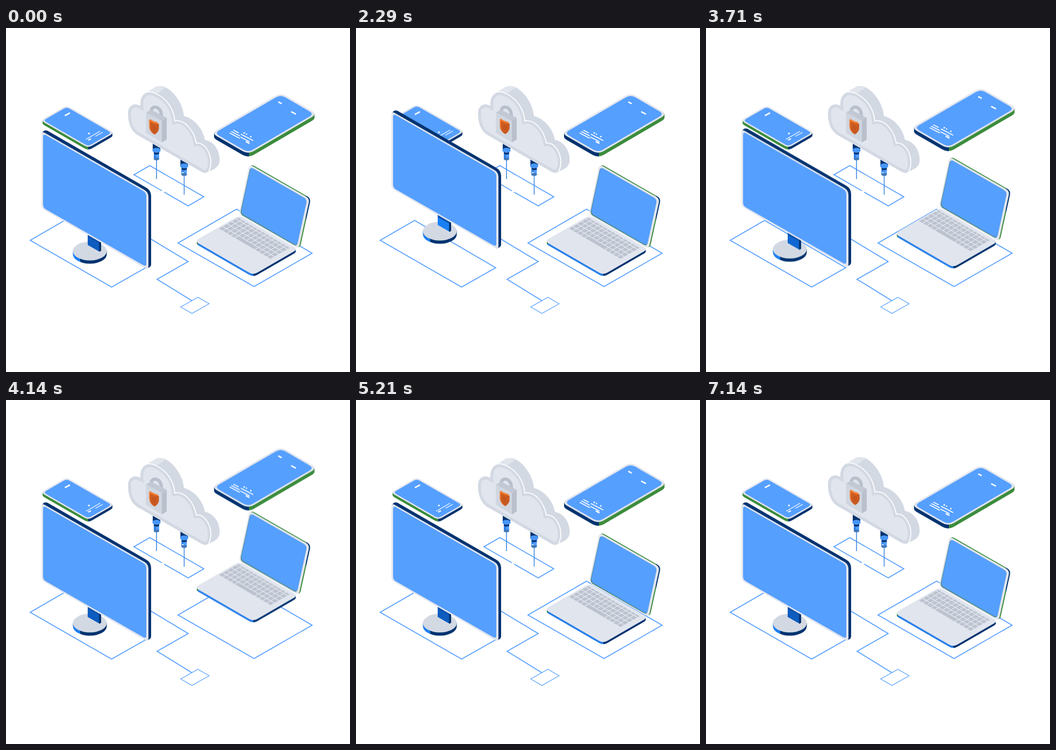
An HTML page for the animation above (7210 ms loop, 640x640 px).

```html
<!DOCTYPE html>
<html lang="en">
<head>
<meta charset="utf-8">
<title>Connected devices</title>
<style>
html, body { margin: 0; width: 100%; height: 100%; overflow: hidden; background: #fff; }
svg { display: block; width: 100vw; height: 100vh; }
.line { fill: none; stroke: #559fff; stroke-width: 1.7; }
.mark { fill: none; stroke: #fff; }

/* --t holds the clock, stepped at 14 pictures a second */
.move {
  animation: 7210ms linear infinite paused;
  animation-delay: calc(var(--t, 0) * -1ms);
}
#phone { --h: -50px; animation-name: phone; }
#monitor { --h: -52px; animation-name: monitor; }
#laptop { --h: -48.5px; animation-name: pair; }
#tablet { --h: -34px; animation-name: pair; }
#cloud { --h: -11px; animation-name: cloud; }
#shade { animation-name: shade; }
#shield { animation-name: sway; animation-duration: 4140ms; }

@keyframes phone {
  0%, .97% { transform: none; animation-timing-function: cubic-bezier(.75,0,.4,1); }
  15.67% { transform: translateY(var(--h)); animation-timing-function: cubic-bezier(.5,0,.8,.8); }
  22.19% { transform: translateY(calc(var(--h) * .33)); animation-timing-function: cubic-bezier(.2,.4,.6,1); }
  36.75%, 100% { transform: none; }
}
@keyframes monitor {
  0%, 22.19% { transform: none; animation-timing-function: cubic-bezier(.75,0,.4,1); }
  37.31% { transform: translateY(var(--h)); animation-timing-function: cubic-bezier(.5,0,.8,.8); }
  43.69% { transform: translateY(calc(var(--h) * .34)); animation-timing-function: cubic-bezier(.2,.4,.6,1); }
  57.56%, 100% { transform: none; }
}
@keyframes pair {
  0%, 44.52% { transform: none; animation-timing-function: cubic-bezier(.75,0,.4,1); }
  59.22% { transform: translateY(var(--h)); animation-timing-function: cubic-bezier(.5,0,.8,.8); }
  66.44% { transform: translateY(calc(var(--h) * .33)); animation-timing-function: cubic-bezier(.2,.4,.6,1); }
  83.22%, 100% { transform: none; }
}
@keyframes cloud {
  0%, 77.25% { transform: none; animation-timing-function: cubic-bezier(.75,0,.4,1); }
  92.09% { transform: translateY(var(--h)); animation-timing-function: cubic-bezier(.5,0,.8,.8); }
  99.03% { transform: translateY(calc(var(--h) * .18)); }
  100% { transform: none; }
}
@keyframes shade {
  0%, 22% { opacity: 1; }
  30%, 44% { opacity: 0; }
  55%, 100% { opacity: 1; }
}
@keyframes sway {
  0%, 100% { transform: translate(-1.3px, .8px); }
  28%, 74% { transform: none; }
}
</style>
</head>
<body>
<svg viewBox="0 0 640 640">
  <defs>
    <linearGradient id="phoneEdge" gradientUnits="userSpaceOnUse" x1="68" x2="198" y1="0" y2="0">
      <stop offset=".655" stop-color="#3c8c3c"/><stop offset=".655" stop-color="#003370"/>
    </linearGradient>
    <linearGradient id="tabletEdge" gradientUnits="userSpaceOnUse" x1="387" x2="574" y1="0" y2="0">
      <stop offset=".35" stop-color="#003370"/><stop offset=".35" stop-color="#3c8c3c"/>
    </linearGradient>
    <linearGradient id="laptopEdge" gradientUnits="userSpaceOnUse" x1="355" x2="540" y1="0" y2="0">
      <stop offset=".012" stop-color="#3c8c3c"/><stop offset=".012" stop-color="#2a80ea"/>
      <stop offset=".57" stop-color="#2a80ea"/><stop offset=".57" stop-color="#003370"/>
    </linearGradient>
    <linearGradient id="lidEdge" gradientUnits="userSpaceOnUse" x1="434" x2="566" y1="0" y2="0">
      <stop offset=".94" stop-color="#3c8c3c"/><stop offset=".94" stop-color="#003370"/>
    </linearGradient>
    <linearGradient id="baseEdge" gradientUnits="userSpaceOnUse" x1="124" x2="188" y1="0" y2="0">
      <stop offset=".22" stop-color="#1f7ff0"/><stop offset=".22" stop-color="#003370"/>
    </linearGradient>
    <path id="front" d="M227 159C227 143 240 139 250 145C249 122 263 114 281 123C299 132 312 150 314 173C331 169 350 190 354 214C368 212 381 230 381 250C381 267 374 273 363 267L243 198C233 191 227 177 227 159Z"/>
    <clipPath id="frontClip"><use href="#front"/></clipPath>
    <g id="plug">
      <path d="M273 206H287V228H273Z" fill="#003370"/>
      <path d="M275 228H285V236H275Z" fill="#003370"/>
      <path d="M275 234Q280 237 285 234V244H275Z" fill="#559fff"/>
      <path d="M275 234Q277 236 279 236V245H275Z" fill="#2a80ea"/>
      <ellipse cx="280" cy="243.5" rx="5" ry="2.8" fill="#4579b8"/>
      <ellipse cx="280" cy="227.5" rx="7.7" ry="4.6" fill="#4796f7"/>
      <path d="M280 246V281" stroke="#4a90e2" stroke-width="1.7"/>
    </g>
  </defs>

  <g id="phone" class="move">
    <g id="phoneBody"/>
    <path class="mark" stroke-width="2.6" d="M109.5 163.2L119 158"/>
    <path class="mark" stroke-width="1.3" d="M149 207L175 192M166.500 201.500L180 194"/>
    <path class="mark" stroke-width="2.3" d="M153 208.500L158 206M152.700 196.500L156 196"/>
  </g>

  <g class="line">
    <path d="M45 395L109 358L260 446L196.500 482Z"/>
    <path d="M238 273L267.500 256L368 314L339 331Z"/>
    <path d="M320 400L429 337L569.500 419L461.500 481Z"/>
    <path d="M262 388L339 434.500L281 467.500L346 507.500"/>
    <path d="M325 519L357 501L378 513L346 531Z" stroke-width="1.1"/>
  </g>
  <path class="mark" stroke-width="3" d="M290 303L294 305.300"/>

  <use href="#plug"/>
  <use href="#plug" x="51.500" y="29"/>
  <circle cx="329" cy="269" r="1.3" fill="#fff"/>

  <g id="cloud" class="move">
    <path fill="#d3d9e3" d="M258 122L278 110C290 104 305 112 316 127C325 139 330 151 331 164C346 166 367 186 370 208C386 211 397 226 397.500 244C398 255 392 260 386 263L370 270L300 200Z"/>
    <path fill="#e1e5ec" d="M260 121L278 110Q288 106 298 110L281 122Z"/>
    <use href="#front" fill="#e1e5ee"/>
    <g clip-path="url(#frontClip)">
      <use href="#front" fill="none" stroke="#d3d9e3" stroke-width="11"/>
    </g>
    <path fill="none" stroke="#fff" stroke-width="1.8" d="M258 121C264 117 273 119 281 123C299 132 312 150 314 173C331 169 350 190 354 214C368 212 381 230 381 250Q381 260 377 266"/>
    <path fill="none" stroke="#b9c0cc" stroke-width="6" d="M270 163V156C270 142 289 145 289 162V172"/>
    <path fill="#c3c9d4" d="M260.500 157L270 152L299 167L290 173Z"/>
    <path fill="#d0d6e0" d="M260.500 157L290 173V213L260.500 195Z"/>
    <path fill="#b9c0cc" d="M290 173L299 167V207.500L290 213Z"/>
    <g id="shield" class="move">
      <path fill="#f47a2d" d="M267.500 170L270 169Q277 174 282 174L285.500 178V188Q283 195 277.500 197.300Q269 193 267.700 184Z"/>
      <path fill="#c4561f" d="M269.500 173Q277 178 285.500 178V187Q283.500 194 277.500 197.300Q270 192 269.500 184Z"/>
      <path fill="none" stroke="#dd6a2a" stroke-width=".9" d="M272 177Q277 180 282.500 180.500V187Q281 191 277.500 193.500Q272.500 190 272 184Z"/>
    </g>
  </g>

  <g id="tablet" class="move">
    <g id="tabletBody"/>
    <path class="mark" stroke-width="2.600" d="M506.500 137.500L513 140.800M530.500 155.700L539.500 160.300M446 211.200L453 214.800"/>
    <path class="mark" stroke-width="1.700" d="M423 190L433 195.300M436 202.700L453 211.500M437 197.500L460 209.500M419 192.500L435 200.800M416 195.300L435 205.200"/>
    <g fill="#fff"><circle cx="443.300" cy="195.300" r="1.500"/><circle cx="447.500" cy="197.500" r="1.300"/><circle cx="455.500" cy="202" r="1.500"/></g>
  </g>

  <g id="laptop" class="move">
    <g id="laptopBody"/>
    <g id="keys" fill="#bcc3cf"/>
    <g id="lid"/>
  </g>

  <g id="monitor" class="move">
    <path fill="url(#baseEdge)" d="M124.500 415V421A31.500 17.500 0 0 0 187.500 421V415Z"/>
    <ellipse cx="156" cy="415" rx="31.500" ry="17.500" fill="#d3d9e3"/>
    <path fill="#1a80f5" d="M152 380L174 392V416L152 403.500Z"/>
    <path fill="#0a4fa8" d="M152 380L174 392V401L152 389Z"/>
    <path id="shade" class="move" fill="#0d5cc0" d="M152 389L174 401V416L152 403.500Z"/>
    <path fill="#003370" d="M173 392L177 394V414.500L174 416.200L173 415.600Z"/>
    <path fill="#003370" d="M67 196Q70 189 77 191L260 296.500Q270 302 270 312V440Q270 443 267 445L261 447.500L240 420L80 215Z"/>
    <path fill="#e1e5ee" d="M66 199Q66 192 72 195L258 301.500Q265 306 265 314V442Q265 450 259 446.500L72 339Q66 335.500 66 329Z"/>
    <path fill="#559fff" d="M69 203Q69 196.500 74.500 199.500L255 303Q261 306.500 261 313V438Q261 444.500 255.500 441.300L74.500 337.500Q69 334.500 69 328Z"/>
  </g>
</svg>
<script>
const LOOP = 7210, STEP = 1000 / 14;
const $ = id => document.getElementById(id);

function add(id, d, fill) {
  const path = document.createElementNS('http://www.w3.org/2000/svg', 'path');
  path.setAttribute('d', d);
  path.setAttribute('fill', fill);
  $(id).append(path);
}

// Closed polygon with corners cut at distance r and rounded
function rounded(pts, r, dx = 0, dy = 0) {
  const n = pts.length;
  const toward = ([ax, ay], [bx, by]) => {
    const k = r / Math.hypot(bx - ax, by - ay);
    return [ax + (bx - ax) * k + dx, ay + (by - ay) * k + dy];
  };
  return pts.map((p, i) => {
    const from = toward(p, pts[(i + n - 1) % n]);
    const to = toward(p, pts[(i + 1) % n]);
    return `${i ? 'L' : 'M'}${from}Q${p[0] + dx} ${p[1] + dy} ${to}`;
  }).join('') + 'Z';
}

function slab(id, pts, r, height, edge) {
  for (let y = height; y > 0; y--) add(id, rounded(pts, r, 0, y), edge);
  add(id, rounded(pts, r), '#e1e5ee');
}

slab('phoneBody', [[113, 144], [201.5, 195], [153, 223], [64.5, 172]], 8, 5, 'url(#phoneEdge)');
add('phoneBody', rounded([[113, 147], [196.5, 195], [153, 220], [69.5, 172]], 6), '#559fff');

slab('tabletBody', [[511, 120.5], [579, 160], [450.5, 235], [382, 195.5]], 12, 7, 'url(#tabletEdge)');
add('tabletBody', rounded([[511, 124], [573, 160], [450.5, 231.5], [388, 195.5]], 10), '#559fff');

slab('laptopBody', [[434, 348.5], [543, 411.5], [460, 459.5], [351, 396.5]], 9, 4, 'url(#laptopEdge)');

// Keyboard grid: u runs along a row, v runs toward the user
const spot = (u, v) => [432 + 97 * u - 37 * v, 353 + 57 * u + 21 * v];
function key(u0, u1, v0, v1) {
  add('keys', `M${spot(u0, v0)}L${spot(u1, v0)}L${spot(u1, v1)}L${spot(u0, v1)}Z`, '#bcc3cf');
}
const rows = [0, .13, .35, .57, .79, 1];
for (let row = 0; row < 5; row++) {
  for (let col = 0; col < 13; col++) {
    const space = row === 4 && col === 4;
    if (row === 4 && col > 4 && col < 9) continue;
    key(col / 13, (col + (space ? 5 : 1)) / 13 - .014, rows[row], rows[row + 1] - .04);
  }
}

const lid = [[453, 253.5], [565, 317.5], [544.5, 411], [433, 347]];
add('lid', rounded(lid, 8, 2.2, -.6), 'url(#lidEdge)');
add('lid', rounded(lid, 8), '#e1e5ee');
add('lid', rounded([[454.5, 258.500], [560, 319], [541, 406.5], [435.500, 346]], 7), '#3c7a58');
add('lid', rounded([[455, 258.5], [560, 319], [541.3, 405.5], [436.5, 345]], 7), '#559fff');

function tick(now) {
  const frame = Math.floor((now % LOOP + 5) / STEP);
  document.documentElement.style.setProperty('--t', Math.min(frame * STEP, LOOP - 1));
  requestAnimationFrame(tick);
}
requestAnimationFrame(tick);
</script>
</body>
</html>
```
